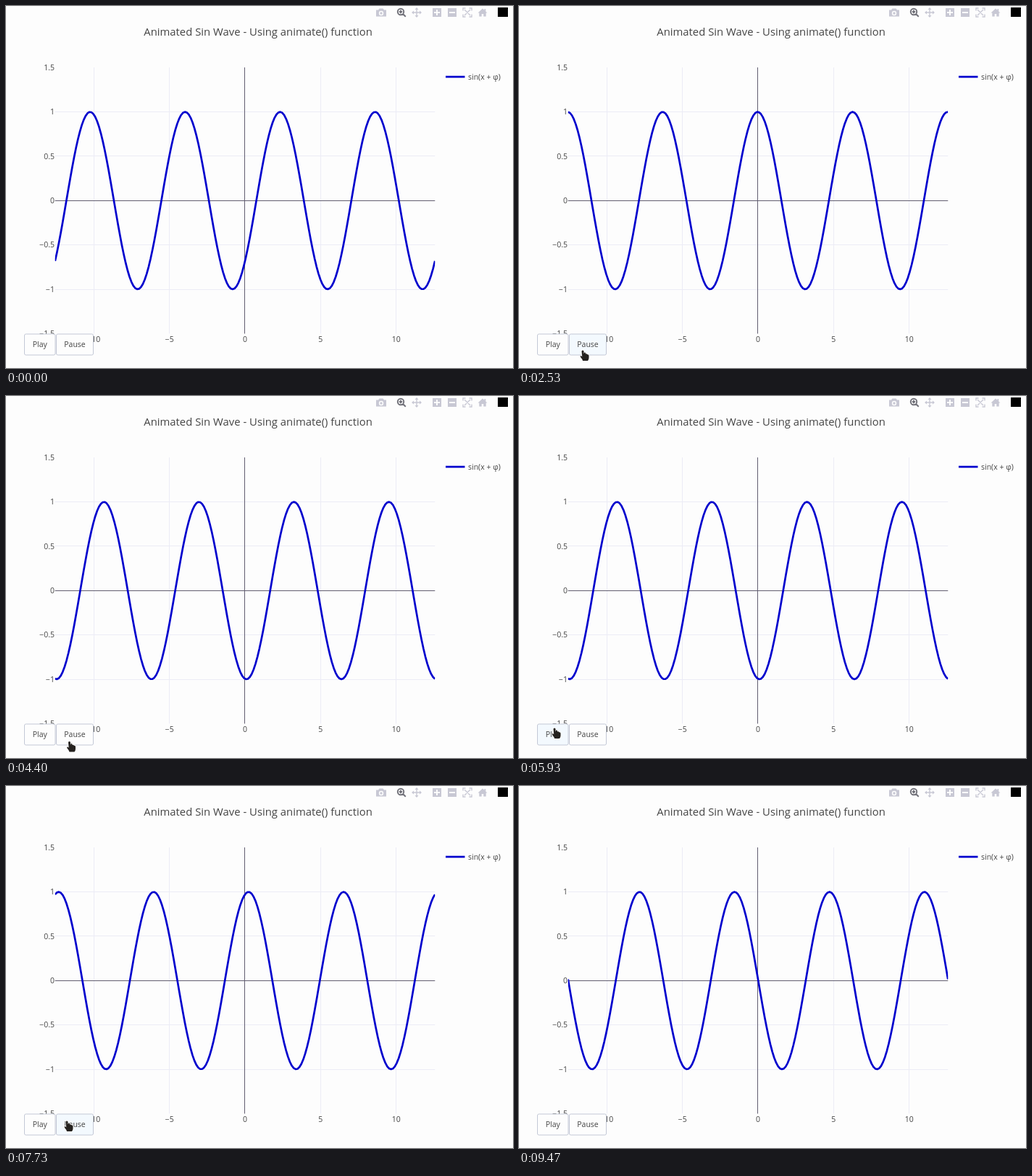
Write an HTML page with a canvas that moves like this. It is 700 by 501 pixels and loops after 9.54 s.

```html
<!DOCTYPE html>
<html lang="en">
<head>
<meta charset="utf-8">
<title>Animated Sin Wave</title>
<style>
  html, body { margin: 0; width: 100%; height: 100%; overflow: hidden; background: #fdfdfd; }
  canvas { display: block; }
</style>
</head>
<body>
<canvas id="stage" width="700" height="501"></canvas>
<script>
const ctx = document.getElementById('stage').getContext('2d');
const LOOP = 9540, STEP = 1000 / 15;
const BG = '#fdfdfd', INK = '#444', WAVE = '#0000cd', AXIS = '#625e70', GRID = '#ececf6';
const ICON = '#c8c8d4', ICON_ON = '#74747c';
const END = 4 * Math.PI, POINTS = 200;
const PLOT = { left: 67.7, top: 85, width: 524.6, height: 368.5 };

// Wave phase: runs at a constant speed between Play and Pause clicks
const START_PHASE = -0.75, SPEED = 1.711 / 1000;
const RUNS = [[1163, 4300], [5981, 8782]];

// Fingertip of the pointer: time, x, y
const POINTER = [
  [500, -16, 488], [1050, 52, 469], [1750, 52, 469], [2500, 88, 477], [3500, 88, 477],
  [3800, 87.5, 478.5], [4900, 87.5, 478.5], [5750, 49, 460], [6300, 49, 460], [7400, 84, 464],
  [8850, 84, 464], [9300, 96, 510]
];
const BUTTONS = [
  { label: 'Play', x: 25.5, w: 42.5, whilePlaying: false },
  { label: 'Pause', x: 69.5, w: 51, whilePlaying: true }
];
const BUTTON_TOP = 454, BUTTON_HEIGHT = 29;

const px = x => 330 + x * 20.87;
const py = y => 269.3 - y * 122.7;
const clamp = (v, lo, hi) => Math.max(lo, Math.min(hi, v));
const phaseAt = t => RUNS.reduce((sum, [a, b]) => sum + SPEED * clamp(t - a, 0, b - a), START_PHASE);
const isPlaying = t => RUNS.some(([a, b]) => t >= a && t < b);

function pointerAt(t) {
  const i = POINTER.findIndex(p => p[0] > t);
  if (i < 1) return null;
  const [t0, x0, y0] = POINTER[i - 1], [t1, x1, y1] = POINTER[i];
  const u = (t - t0) / (t1 - t0), k = u * u * (3 - 2 * u);
  return { x: x0 + (x1 - x0) * k, y: y0 + (y1 - y0) * k };
}

function text(str, x, y, align = 'center', size = 10.5) {
  ctx.font = `${size}px "Open Sans", sans-serif`;
  ctx.textAlign = align;
  ctx.fillStyle = INK;
  ctx.fillText(str, x, y);
}

function line(x0, y0, x1, y1, color, width = 1) {
  ctx.beginPath();
  ctx.moveTo(x0, y0);
  ctx.lineTo(x1, y1);
  ctx.strokeStyle = color;
  ctx.lineWidth = width;
  ctx.stroke();
}

// Icon paths are centred on their own origin
function icon(x, d, color = ICON, stroke = 0) {
  const path = new Path2D(d);
  ctx.save();
  ctx.translate(x, 9);
  ctx.fillStyle = ctx.strokeStyle = color;
  ctx.lineWidth = stroke;
  if (stroke) ctx.stroke(path); else ctx.fill(path, 'evenodd');
  ctx.restore();
}

function drawModebar() {
  icon(518, 'M-7-3.5h3l1.5-2h5l1.5 2h3v9h-14zM3.2 1a3.2 3.2 0 1 0-6.4 0a3.2 3.2 0 1 0 6.4 0zM1.7 1a1.7 1.7 0 1 1-3.4 0a1.7 1.7 0 1 1 3.4 0z');
  icon(545.5, 'M3.7-1a4.2 4.2 0 1 1-8.4 0a4.2 4.2 0 1 1 8.4 0M2.5 2L6.3 5.8M-2.7-1h4.4M-.5-3.2v4.4', ICON_ON, 2);
  icon(567, 'M-6 0H6M0-6V6', ICON, 1.4);
  icon(567, 'M-7 0l3-2.5v5zM7 0l-3-2.5v5zM0-7l-2.5 3h5zM0 7l-2.5-3h5z');
  icon(595, 'M-6-6h12v12h-12zM-1-4v3h-3v2h3v3h2v-3h3v-2h-3v-3z');
  icon(616, 'M-6-6h12v12h-12zM-4-1v2h8v-2z');
  icon(637, 'M-4-4L4 4M4-4L-4 4M-6-2.5V-6h3.5M2.5-6H6v3.5M6 2.5V6H2.5M-2.5 6H-6V2.5', ICON, 1.4);
  icon(658, 'M0-5.5L2.5-3.2V-5H4.3V-1.6L6.5.5H4.7V5.5H1.3V2H-1.3V5.5H-4.7V.5H-6.5z');
  icon(686, 'M-7-7h14v13h-14z', '#000');
}

function drawAxes() {
  const { left, top, width, height } = PLOT, right = left + width, bottom = top + height;
  const label = v => String(v).replace('-', '\u2212');
  const xTicks = [-10, -5, 0, 5, 10], yTicks = [-1.5, -1, -0.5, 0, 0.5, 1, 1.5];
  const crisp = v => Math.floor(v) + 0.5;
  for (const x of xTicks) {
    if (x) line(crisp(px(x)), top, crisp(px(x)), bottom, GRID);
    text(label(x), px(x), 465);
  }
  for (const y of yTicks) {
    if (y && Math.abs(y) < 1.5) line(left, crisp(py(y)), right, crisp(py(y)), GRID);
    text(label(y), 67, py(y) + 3.6, 'right');
  }
  line(left, crisp(py(0)), right, crisp(py(0)), AXIS);
  line(329.5, top, 329.5, bottom, AXIS);
}

function drawWave(phase) {
  ctx.save();
  ctx.beginPath();
  ctx.rect(PLOT.left, PLOT.top, PLOT.width, PLOT.height);
  ctx.clip();
  ctx.beginPath();
  for (let i = 0; i < POINTS; i++) {
    const x = END * (2 * i / (POINTS - 1) - 1);
    ctx.lineTo(px(x), py(Math.sin(x + phase)));
  }
  ctx.strokeStyle = WAVE;
  ctx.lineWidth = 2.7;
  ctx.lineJoin = 'round';
  ctx.stroke();
  ctx.restore();
}

function drawButtons(pointer, playing) {
  for (const { label, x, w, whilePlaying } of BUTTONS) {
    const inside = pointer && pointer.x > x && pointer.x < x + w &&
      pointer.y > BUTTON_TOP && pointer.y < BUTTON_TOP + BUTTON_HEIGHT;
    const hover = inside && playing === whilePlaying;
    ctx.beginPath();
    ctx.roundRect(x, BUTTON_TOP, w, BUTTON_HEIGHT, 2);
    ctx.fillStyle = hover ? '#f3f9fe' : BG;
    ctx.fill();
    ctx.strokeStyle = '#c3c8d6';
    ctx.lineWidth = 1;
    ctx.stroke();
    text(label, x + w / 2, 472);
  }
}

const HAND = new Path2D('M-1.5 1Q-1.5-.5 0-.5Q1.5-.5 1.5 1V4.5Q3 0 4.2 4.5Q5.8 3.5 6.3 5.2Q8.5 4.8 8.5 7V10Q8.5 12 7 14H0Q-.7 11.5-3 9Q-4 7.2-2.5 7L-.8 8.2z');

function drawPointer({ x, y }) {
  ctx.save();
  ctx.translate(x, y);
  ctx.strokeStyle = '#fff';
  ctx.lineWidth = 1.6;
  ctx.stroke(HAND);
  ctx.fillStyle = '#25221f';
  ctx.fill(HAND);
  ctx.restore();
}

function draw(now) {
  const t = Math.floor((now % LOOP + 5) / STEP) * STEP;
  const pointer = pointerAt(t);
  ctx.fillStyle = BG;
  ctx.fillRect(0, 0, 700, 501);
  drawModebar();
  text('Animated Sin Wave - Using animate() function', 348, 41, 'center', 14.87);
  drawAxes();
  drawWave(phaseAt(t));
  line(607, 98, 633.5, 98, WAVE, 2.7);
  text('sin(x + φ)', 638, 101.6, 'left');
  drawButtons(pointer, isPlaying(t));
  if (pointer) drawPointer(pointer);
}

const began = performance.now();
function tick() {
  draw(performance.now() - began);
  requestAnimationFrame(tick);
}
tick();
</script>
</body>
</html>
```
